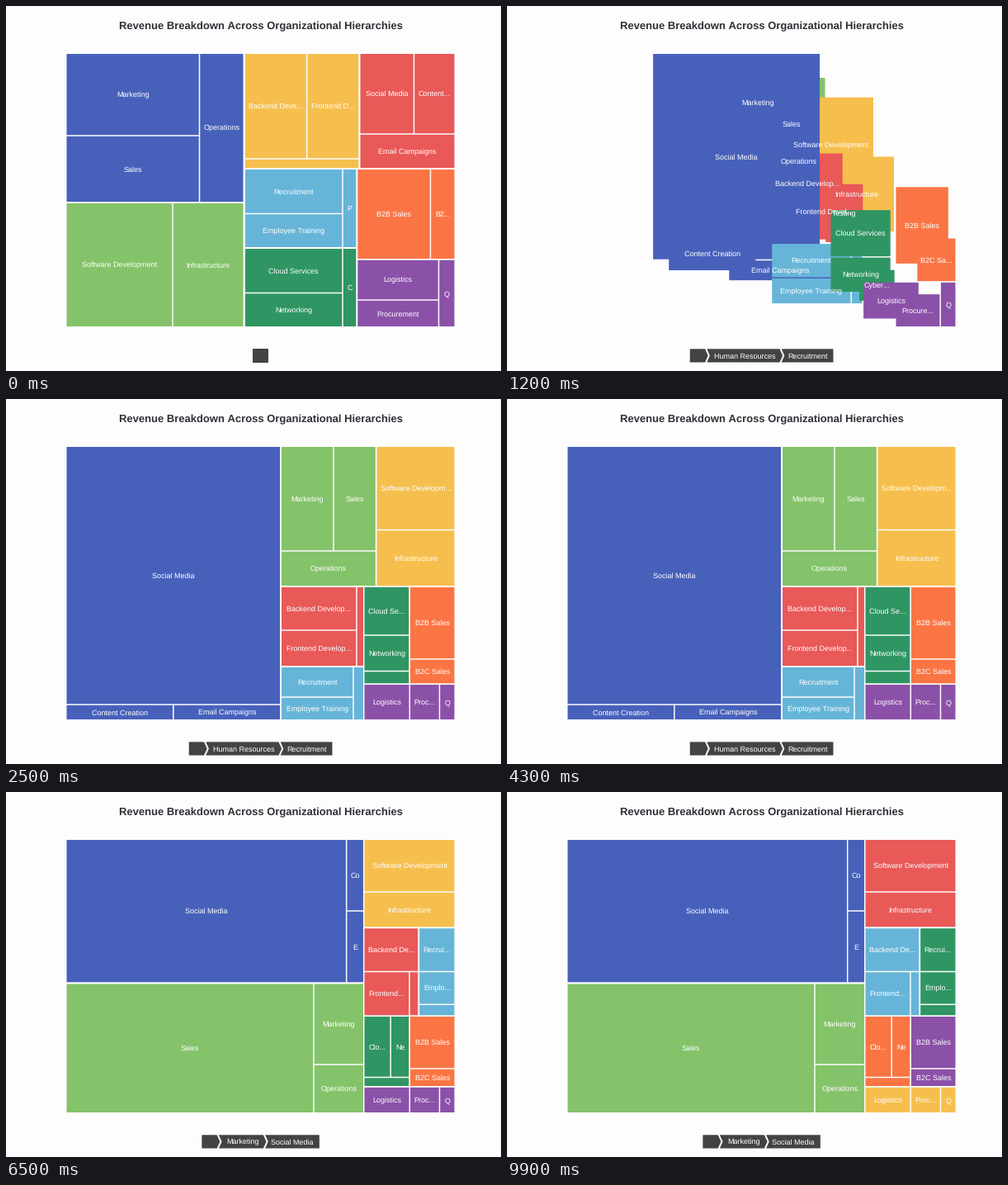
These frames come from a looping animation (600x442 px, 10 s). A matplotlib script:

```python
import matplotlib.pyplot as plt
from matplotlib.animation import FuncAnimation
from matplotlib.patches import Polygon, Rectangle
from matplotlib.textpath import text_to_path

W, H, DPI = 600, 442, 100
SCALE = 0.733            # CSS pixels to stage pixels
FONT = 12 * SCALE
PAD = 5 * SCALE
GAP = 1.5
CX = 308.6
STEP = 100
FRAMES = 100
DURATION = 1500
UPDATES = (373, 5132, 9890)

PALETTE = ["#4761bb", "#84c36a", "#f6bf4d", "#e85958",
           "#66b5d8", "#2f9563", "#fb7544", "#8b51a8"]

GROUPS = [
    ["Marketing", "Sales", "Operations"],
    ["Software Development", "Infrastructure"],
    ["Backend Development", "Frontend Development", "Testing"],
    ["Social Media", "Content Creation", "Email Campaigns"],
    ["Recruitment", "Employee Training", "Payroll"],
    ["Cloud Services", "Networking", "Cybersecurity"],
    ["B2B Sales", "B2C Sales"],
    ["Logistics", "Procurement", "Quality Control"],
]

# Per group: bounds and nested cuts (axis, position, before, after)
LAYOUTS = [
    [
        ((73.5, 58, 287.5, 237), ("x", 234.5, ("y", 157, 0, 1), 2)),
        ((73.5, 239, 287.5, 388), ("x", 202, 0, 1)),
        ((290, 58, 427.3, 196), ("y", 185, ("x", 364.7, 0, 1), 2)),
        ((429.5, 58, 543.5, 196), ("y", 155, ("x", 494.5, 0, 1), 2)),
        ((290, 198, 424.3, 292), ("x", 408, ("y", 251.5, 0, 1), 2)),
        ((290, 294, 424.3, 388), ("x", 408, ("y", 347.5, 0, 1), 2)),
        ((426.3, 198, 543.5, 306), ("x", 514.5, 0, 1)),
        ((426.3, 307.7, 543.5, 388), ("x", 524.5, ("y", 356, 0, 1), 2)),
    ],
    [
        ((334, 58, 447.8, 226), ("y", 184, ("x", 397, 0, 1), 2)),
        ((449.5, 58, 543.5, 226), ("y", 158.5, 0, 1)),
        ((334, 228, 433, 323), ("x", 425, ("y", 280, 0, 1), 2)),
        ((73.5, 58, 332, 388), ("y", 370, 0, ("x", 202.8, 1, 2))),
        ((334, 325, 433, 388), ("x", 421, ("y", 361, 0, 1), 2)),
        ((434.5, 228, 488.3, 344.3), ("y", 329.5, ("y", 286, 0, 1), 2)),
        ((490, 228, 543.5, 344.3), ("y", 315, 0, 1)),
        ((434.5, 346, 543.5, 388), ("x", 525.5, ("x", 489.3, 0, 1), 2)),
    ],
    [
        ((73.5, 232.5, 433, 388), ("x", 373, 1, ("y", 330, 0, 2))),
        ((434.5, 58, 543.5, 163.3), ("y", 121, 0, 1)),
        ((434.5, 165.2, 499.3, 270.3), ("y", 217.5, 0, ("x", 489, 1, 2))),
        ((73.5, 58, 433, 230.3), ("x", 412.7, 0, ("y", 144, 1, 2))),
        ((501.2, 165.2, 543.5, 270.3), ("y", 257.3, ("y", 217.5, 0, 1), 2)),
        ((434.5, 272, 488.3, 356), ("y", 345.5, ("x", 466.2, 0, 1), 2)),
        ((490, 272, 543.5, 356), ("y", 335, 0, 1)),
        ((434.5, 357.8, 543.5, 388), ("x", 525.5, ("x", 489.3, 0, 1), 2)),
    ],
]
RANKS = [
    (0, 1, 2, 3, 4, 5, 6, 7),
    (1, 2, 3, 0, 4, 5, 6, 7),
    (1, 2, 3, 0, 4, 5, 6, 7),
    (1, 3, 4, 0, 5, 6, 7, 2),
]
CRUMBS = [
    [""],
    ["", "Human Resources", "Recruitment"],
    ["", "Marketing", "Social Media"],
    ["", "Marketing", "Social Media"],
]


def split(box, spec, leaves):
    """Cut a box recursively, storing one rectangle per leaf index."""
    if isinstance(spec, int):
        leaves[spec] = box
        return leaves
    axis, at, before, after = spec
    x0, y0, x1, y1 = box
    lo, hi = at - GAP / 2, at + GAP / 2
    if axis == "x":
        split((x0, y0, lo, y1), before, leaves)
        split((hi, y0, x1, y1), after, leaves)
    else:
        split((x0, y0, x1, lo), before, leaves)
        split((x0, hi, x1, y1), after, leaves)
    return leaves


def flatten(layout):
    boxes = []
    for box, spec in layout:
        leaves = split(box, spec, {})
        boxes += [leaves[i] for i in sorted(leaves)]
    return boxes


def quintic_in_out(p):
    p = min(max(p, 0), 1)
    return 16 * p ** 5 if p < 0.5 else 1 - 16 * (1 - p) ** 5


plt.rcParams["font.family"] = "Liberation Sans"
plt.rcParams["text.hinting"] = "none"
plt.rcParams["text.hinting_factor"] = 1

fig = plt.figure(figsize=(W / DPI, H / DPI), dpi=DPI, facecolor="#fefdfe")
ax = fig.add_axes([0, 0, 1, 1])
ax.set_xlim(0, W)
ax.set_ylim(H, 0)
ax.axis("off")


def add_text(x, y, s, px=FONT, color="white", **kw):
    return ax.text(x, y + 0.35 * px, s, fontsize=px * 72 / DPI, color=color,
                   ha="center", va="baseline", **kw)


add_text(CX, 24, "Revenue Breakdown Across Organizational Hierarchies",
         18 * SCALE, "#302f36", weight="bold")

STATES = [flatten(layout) for layout in LAYOUTS]
STATES.append(STATES[-1])
NAMES = [name for group in GROUPS for name in group]
OWNER = [g for g, group in enumerate(GROUPS) for _ in group]

tiles = [ax.add_patch(Rectangle((0, 0), 1, 1, lw=0, snap=False, zorder=2))
         for _ in NAMES]
labels = [add_text(0, 0, "", zorder=3) for _ in NAMES]
label_font = labels[0].get_fontproperties()
widths = {}


def ink(s):
    w = text_to_path.get_text_width_height_descent(s, label_font, False)[0]
    return w * DPI / 72


def text_width(s):
    if s not in widths:
        widths[s] = ink("|" + s + "|") - ink("||")
    return widths[s]


def truncate(s, room):
    """Shorten s with an ellipsis, or without one in very narrow tiles."""
    room -= SCALE
    if room <= 0:
        return ""
    if text_width(s) <= room:
        return s
    char, dots = text_width("a"), "..."
    left = room
    for _ in range(2):
        if left >= char:
            left -= char
    if text_width(dots) > left:
        dots = ""
    room -= text_width(dots)
    n = 0
    while n < len(s) and n * char < room:
        n += 1
    s = s[:n]
    if text_width(s) > room:
        s = s[:int(len(s) * room / text_width(s))]
    return s + dots if s else ""


def make_crumbs(items):
    """Chain of arrow-shaped boxes centred under the chart."""
    gap, arrow, pad = 8 * SCALE, 5 * SCALE, 8 * SCALE
    top, bottom = 415.3, 431.5
    mid = (top + bottom) / 2
    sizes = [max(text_width(s) + 2 * pad, 25 * SCALE) if s else 25 * SCALE
             for s in items]
    x = CX - (sum(sizes) + gap * (len(items) - 1)) / 2
    parts = []
    for i, (s, w) in enumerate(zip(items, sizes)):
        first, last = i == 0, i == len(items) - 1
        left = x if first else x - arrow
        right = x + w if last else x + w + arrow
        pts = [(left, top), (x + w, top), (right, mid),
               (x + w, bottom), (left, bottom), (x, mid)]
        parts.append(ax.add_patch(Polygon(pts, fc="#434343", lw=0)))
        parts.append(add_text((left + right) / 2, mid, s, zorder=3))
        x += w + gap
    return parts


crumbs = [make_crumbs(items) for items in CRUMBS]


def draw(frame):
    t = frame * STEP
    state = sum(t >= u for u in UPDATES)
    k = quintic_in_out((t - UPDATES[state - 1]) / DURATION) if state else 1
    start, end = STATES[max(state - 1, 0)], STATES[state]
    for i, name in enumerate(NAMES):
        x0, y0, x1, y1 = (a + (b - a) * k for a, b in zip(start[i], end[i]))
        tiles[i].set_bounds(x0, y0, x1 - x0, y1 - y0)
        tiles[i].set_facecolor(PALETTE[RANKS[state][OWNER[i]]])
        fits = y1 - y0 - 2 * PAD >= FONT
        labels[i].set_text(truncate(name, x1 - x0 - 2 * PAD) if fits else "")
        labels[i].set_position(((x0 + x1) / 2, (y0 + y1) / 2 + 0.35 * FONT))
    for i, parts in enumerate(crumbs):
        for part in parts:
            part.set_visible(i == state)
    return tiles + labels


anim = FuncAnimation(fig, draw, frames=FRAMES, interval=STEP,
                     repeat=True, repeat_delay=0, blit=False)
plt.show()
```
